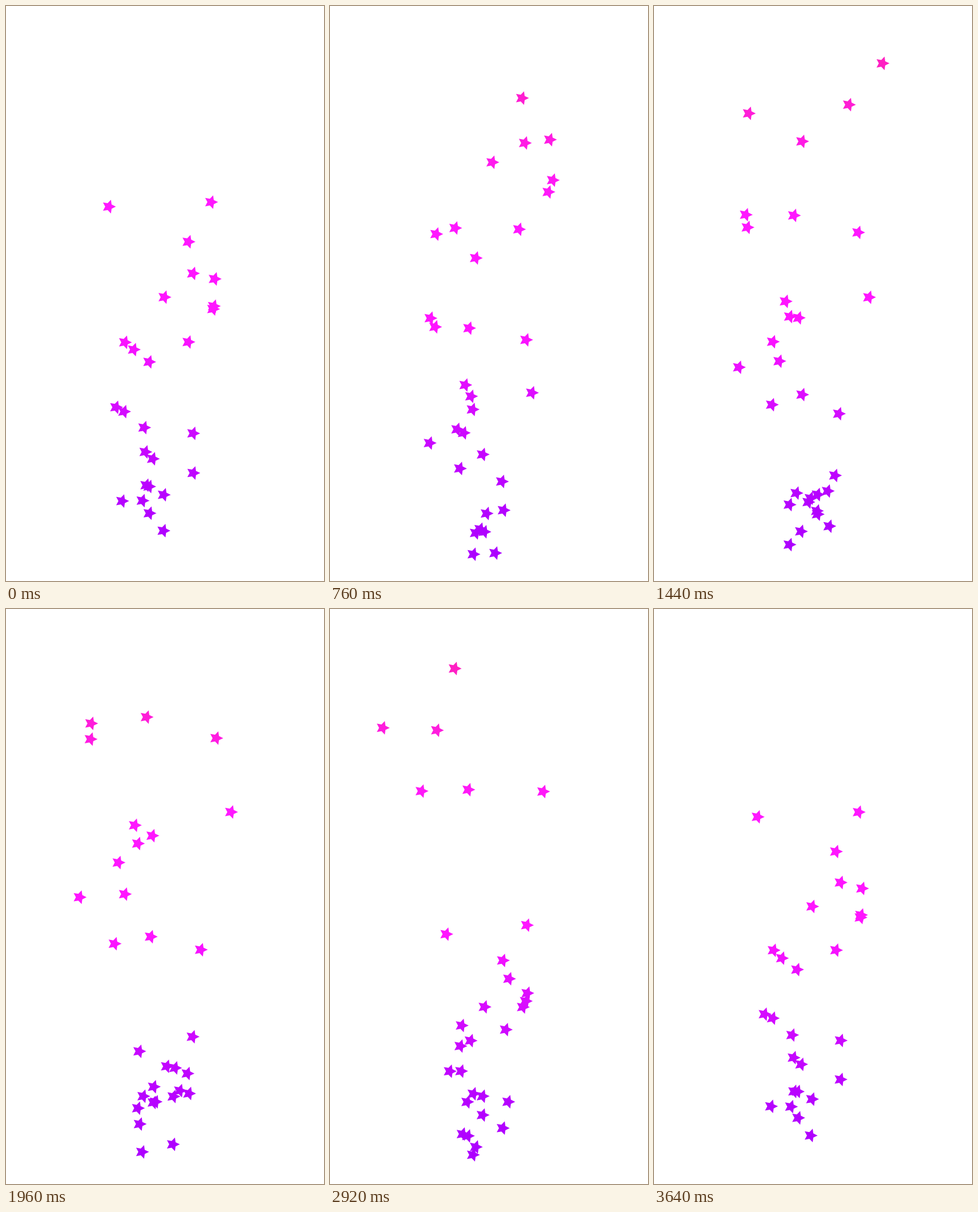
These frames come from a looping animation (557 px wide and 1006 px high, 3680 ms). An HTML page with a canvas:

```html
<!DOCTYPE html>
<html lang="en">
<head>
<meta charset="utf-8">
<title>Rising stars</title>
<style>
  html, body { margin: 0; width: 100%; height: 100%; overflow: hidden; background: #fff; }
  canvas { display: block; width: 557px; height: 1006px; }
</style>
</head>
<body>
<canvas id="stage" width="557" height="1006"></canvas>
<script>
const W = 557, H = 1006;
const STEP = 40;      // ms per tick
const LOOP = 92;      // ticks per loop
const LIFE = 105;     // ticks a star stays visible
const LIFT = 0.068;   // half the upward acceleration, px per tick squared
const HEAD = 2.8;     // ticks a star has already moved when it appears

// start x, start y, sideways speed in px per tick; in order of emission
const stars = [
  [295.8, 948.8, -1.235], [290.4, 903.2, 0.755], [242, 936.2, 0.88],
  [276.7, 966, 1.043], [247.8, 963.9, 0.359], [269.8, 889.6, 0.728],
  [259.1, 915.3, 1.38], [241, 961, -0.24], [289.6, 861, 1.043],
  [278.4, 890.8, 0.61], [283, 864.7, -1.175], [235.9, 873.5, 0.24],
  [236.7, 964.2, 0.087], [283.1, 944, 0.826], [237.7, 877, -0.89],
  [263.8, 864.4, -1.198], [267.4, 953, 1.348], [236.3, 956.7, 0.217],
  [272.1, 967.3, -0.859], [257.3, 866.8, -0.377], [274.4, 864.8, -0.533],
  [248.4, 926, -1.52], [273.8, 889, -0.87], [243.6, 956, 1.337],
  [276.9, 916.4, -1.247], [284.3, 876.2, -0.466]
];

const ctx = document.getElementById("stage").getContext("2d");

const tint = ctx.createLinearGradient(0, 0, 0, H);
[[90, "#ff20c0"], [230, "#ff1ce2"], [350, "#ff18ff"], [570, "#ff14ff"],
 [700, "#d60cff"], [780, "#c606ff"], [860, "#b602ff"], [960, "#ac00ff"]]
  .forEach(([y, color]) => tint.addColorStop(y / H, color));

function drawStar(x, y) {
  ctx.beginPath();
  for (let k = 0; k < 10; k++) {
    const r = k % 2 ? 6.2 : 12.5;
    const a = k * Math.PI / 5;
    ctx.lineTo(x + r * Math.cos(a), y + r * Math.sin(a));
  }
  ctx.fill();
}

function render(tick) {
  ctx.clearRect(0, 0, W, H);
  ctx.fillStyle = tint;
  stars.forEach(([x, y, vx], i) => {
    // one star every three ticks, with one skipped tick halfway
    const born = 1 + 3 * i + (i > 12 ? 1 : 0);
    for (let age = (tick - born + LOOP) % LOOP; age < LIFE; age += LOOP) {
      const s = age + HEAD;
      drawStar(x + vx * s, y + 0.5 - LIFT * s * s);
    }
  });
}

const start = performance.now();
let shown = -1;

function loop() {
  const tick = Math.floor((performance.now() - start) / STEP) % LOOP;
  if (tick !== shown) render(shown = tick);
  requestAnimationFrame(loop);
}
loop();
</script>
</body>
</html>
```
